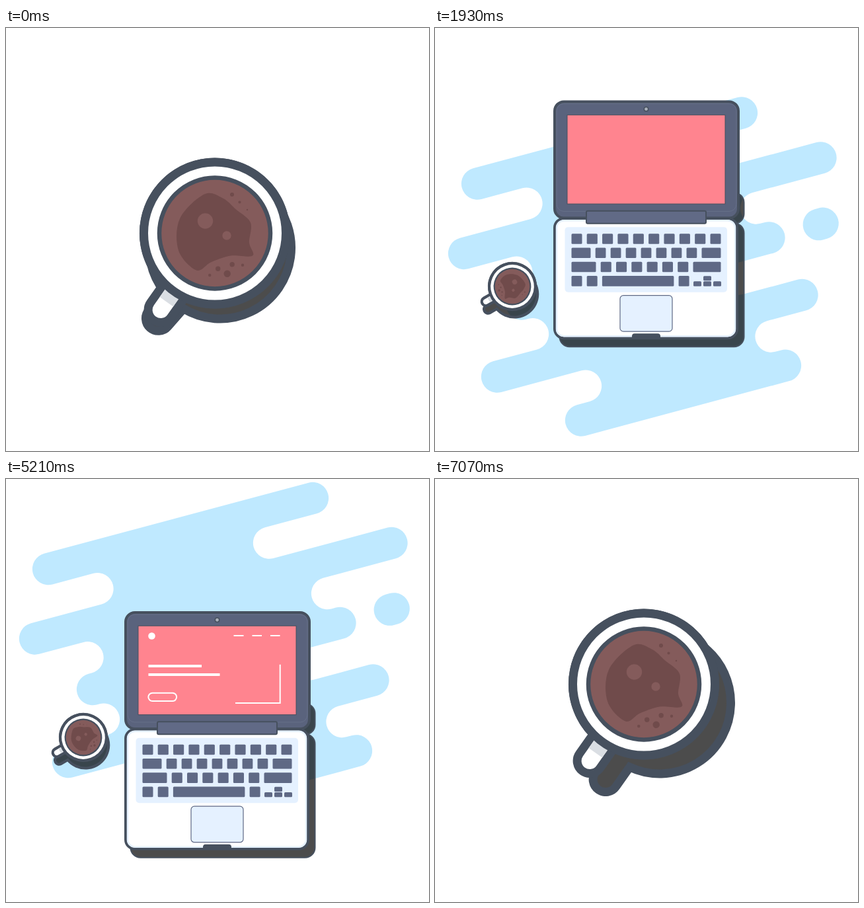
An HTML page for the animation above (7.21 s loop, 640x640 px).

```html
<!DOCTYPE html>
<html lang="en">
<head>
<meta charset="utf-8">
<title>Desk</title>
<style>
  html, body { margin: 0; width: 100%; height: 100%; overflow: hidden; background: #fff; }
  svg { display: block; width: 100%; height: 100%; }
  .ink { fill: #46505e; }
  .key { fill: #5f6985; }
  .pale { fill: #e5f1ff; }
  .shade { fill: #000; fill-opacity: .7; stroke: #46505e; stroke-width: 2; }
  .edge { stroke: #46505e; }
  .line { fill: none; stroke: #fff; stroke-dasharray: 1 1; }
  .dark { fill: #704b4b; }
  .light { fill: #845b5b; }
</style>
</head>
<body>
<svg viewBox="0 0 640 640">
  <defs>
    <path id="outline" transform="rotate(125.2)"
      d="M105.8 -19H142A19 19 0 0 1 142 19H105.8A107.5 107.5 0 1 1 105.8 -19z"/>
  </defs>

  <g id="splash" fill="#bfe9ff">
    <path id="blot"/>
    <path d="M580.6 261.7L586.8 260" stroke="#bfe9ff" stroke-width="48" stroke-linecap="round"/>
  </g>

  <g id="laptop">
    <rect class="shade" x="189" y="280" width="279" height="47" rx="15"/>
    <rect class="shade" x="189" y="326" width="279" height="187" rx="15"/>
    <rect class="edge" x="181.5" y="142.3" width="278" height="176" rx="14" fill="#5a637d" stroke-width="4"/>
    <rect x="184.5" y="145.3" width="272" height="163" rx="11" fill="none" stroke="#667089"/>
    <rect class="edge" x="200.5" y="162.5" width="239" height="134.5" fill="#ff848f"/>
    <circle class="edge" cx="320" cy="153.5" r="3.2" fill="#a9b0bb" stroke-width="1.5"/>
    <g id="page">
      <circle cx="221" cy="177.8" r="5.3" fill="#fff"/>
      <path class="line" pathLength="1" stroke-width="2" d="M345 177.3h15"/>
      <path class="line" pathLength="1" stroke-width="2" d="M373 177.3h14.5"/>
      <path class="line" pathLength="1" stroke-width="2" d="M400.5 177.3h14.5"/>
      <path class="line" pathLength="1" stroke-width="4" d="M216 223.2h80.5"/>
      <path class="line" pathLength="1" stroke-width="4" d="M216 236.3h108"/>
      <path class="line" pathLength="1" stroke-width="2" d="M222 264h30.5a6.1 6.1 0 0 1 0 12.3h-30.5a6.1 6.1 0 0 1 0 -12.3z"/>
      <path class="line" pathLength="1" stroke-width="2" d="M415.2 221v58.2h-67.7"/>
    </g>
    <rect class="edge" x="181.5" y="319" width="276" height="181" rx="14" fill="#fff" stroke-width="4"/>
    <rect x="184.5" y="322" width="270" height="175" rx="11" fill="none" stroke="#e5f1ff" stroke-width="2.5"/>
    <rect class="edge" x="229.5" y="307.5" width="181" height="19" rx="2" fill="#616a86" stroke-width="2"/>
    <rect class="pale" x="197" y="332" width="245.5" height="98.5" rx="5"/>
    <g id="keys"></g>
    <rect class="pale" x="280.5" y="435.5" width="79" height="54.5" rx="5" stroke="#5f6985" stroke-width="1.2"/>
    <path class="ink" d="M298.5 501v-4q0 -4 4 -4h35q4 0 4 4v4z"/>
  </g>

  <g id="cup" stroke-width="13">
    <use id="shadow" class="edge" href="#outline" fill="#000" fill-opacity=".7"/>
    <use class="edge" href="#outline" fill="#fff"/>
    <path d="M100 0H127" transform="rotate(125.2)" stroke="#dadee3" stroke-width="25"/>
    <circle class="edge" r="107.5" fill="#fff"/>
    <circle class="edge light" r="84" stroke-width="6.5"/>
    <g id="foam" class="dark" stroke-width="0"><path id="blob"/></g>
    <g id="bubbles" class="light">
      <circle cx="-14.5" cy="-18.5" r="11.7"/>
      <circle cx="18" cy="3.5" r="6.7"/>
    </g>
  </g>
</svg>
<script>
const LOOP = 7210;
const $ = id => document.getElementById(id);

function add(parent, tag, attrs) {
  const node = document.createElementNS('http://www.w3.org/2000/svg', tag);
  for (const name in attrs) node.setAttribute(name, attrs[name]);
  parent.append(node);
}

// Slanted lanes of equal height with round ends: fingers on even lanes, bays on odd ones.
function blotPath() {
  const left = [64, 138.5, 44, 123.5, 131, 148, 94, 228, 221];
  const right = [464, 398, 583.5, 486, 505.5, 459, 555.5, 508.5, 530];
  const slope = Math.PI / 12, lane = 50;
  const r = lane * Math.cos(slope) / 2;
  const cap = (x, i, side) => {
    const y = 200 + lane * i - Math.tan(slope) * (x - left[0]);
    const dx = side * r * Math.sin(slope), dy = side * r * Math.cos(slope);
    return `L${x - dx} ${y - dy}A${r} ${r} 0 0 ${i % 2} ${x + dx} ${y + dy}`;
  };
  const down = left.map((x, i) => cap(x, i, 1));
  const up = right.map((x, i) => cap(x, i, -1)).reverse();
  return 'M' + [...down, ...up].join('').slice(1) + 'z';
}

// Closed Catmull-Rom curve through the points.
function smoothPath(points) {
  const at = i => points[(i + points.length) % points.length];
  return 'M' + at(0) + points.map((p, i) => {
    const [a, c, d] = [at(i - 1), at(i + 1), at(i + 2)];
    const c1 = p.map((v, k) => v + (c[k] - a[k]) / 6);
    const c2 = c.map((v, k) => v - (d[k] - p[k]) / 6);
    return `C${c1} ${c2} ${c}`;
  }).join('') + 'z';
}

function addKeys() {
  const left = 207, span = 226, gap = 7.2;
  const key = (x, y, width, height) =>
    add($('keys'), 'rect', { class: 'key', x, y, width, height, rx: 1.5 });
  const addRow = (row, widths) => {
    let x = left;
    for (const width of widths) {
      key(x, 342 + 21.3 * row, width, 15.6);
      x += width + gap;
    }
  };
  // Plain keys share the room between the first and the last key.
  const fill = (first, count, last) => {
    const width = (span - first - last - gap * (count + 1)) / count;
    return [first, ...Array(count).fill(width), last];
  };
  addRow(0, fill(16, 8, 16));
  addRow(1, fill(29, 7, 29));
  addRow(2, fill(37, 6, 42));
  addRow(3, [16, 16, 108.5, 16]);
  for (let i = 0; i < 3; i++) key(391.5 + i * 15, 414.2, 12, 7.4);
  key(406.5, 406, 12, 7.2);
}

function addFoamDots() {
  for (let i = 0; i < 5; i++) {
    const angle = (97 - 12 * i) * Math.PI / 180, reach = 64 - 10 * (i % 2);
    add($('foam'), 'circle', {
      cx: reach * Math.cos(angle), cy: reach * Math.sin(angle), r: 5.2 - 1.5 * Math.abs(i - 2)
    });
  }
  for (let i = 0; i < 3; i++)
    add($('foam'), 'circle', { cx: 26 + 11.5 * i, cy: 11.5 * i - 58.5, r: 3 - .9 * i });
}

$('blot').setAttribute('d', blotPath());
$('blob').setAttribute('d', smoothPath([[-16, -59], [12, -53], [32, -36], [54, -16], [52, 14],
  [57, 34], [24, 34], [-6, 44], [-28, 56], [-55, 26], [-53, -22]]));
addKeys();
addFoamDots();

const mix = (a, b, k) => a + (b - a) * k;

function ease(t, start, end) {
  const x = Math.min(1, Math.max(0, (t - start) / (end - start)));
  return x * x * (3 - 2 * x);
}

// Slide in past the rest position, settle, swing back as far, then slide out.
function slide(t, from, over, to) {
  return mix(from, over, ease(t, 757, 2200)) - over * ease(t, 2200, 2800)
    - over * ease(t, 4437, 4854) + (to + over) * ease(t, 4854, 6354);
}

const pageParts = [...$('page').children];
const place = (id, value) => $(id).setAttribute('transform', value);

function draw(t) {
  place('splash', `translate(0 ${slide(t, 634, -24.5, -593.5)})`);
  place('laptop', `translate(-.5 ${slide(t, -559, 22.2, 550.6)})`);

  pageParts.forEach((part, i) => {
    const k = ease(t, 2150 + i * 50, 2650 + i * 50);
    if (i === 0) part.setAttribute('r', 5.3 * k);
    else part.style.strokeDashoffset = 1 - k;
    part.style.visibility = k > 0 ? 'visible' : 'hidden';
  });

  const cast = ease(t, 0, 780);
  const aside = cast - ease(t, 6120, 6900);
  const turn = 25 * aside;
  const swirl = 360 * ease(t, 0, 7100);
  place('cup', `translate(${mix(316, 117, aside)} ${mix(310.5, 391, aside)}) rotate(${turn}) scale(${mix(1, .325, aside)})`);
  place('shadow', `translate(${mix(8, 24, cast)} ${mix(22, 28, cast)}) rotate(${mix(6, 0, cast)})`);
  place('foam', `rotate(${swirl})`);
  place('bubbles', `rotate(${swirl - turn})`);
}

const begin = performance.now();
function frame() {
  draw((performance.now() - begin) % LOOP);
  requestAnimationFrame(frame);
}
draw(0);
requestAnimationFrame(frame);
</script>
</body>
</html>
```
